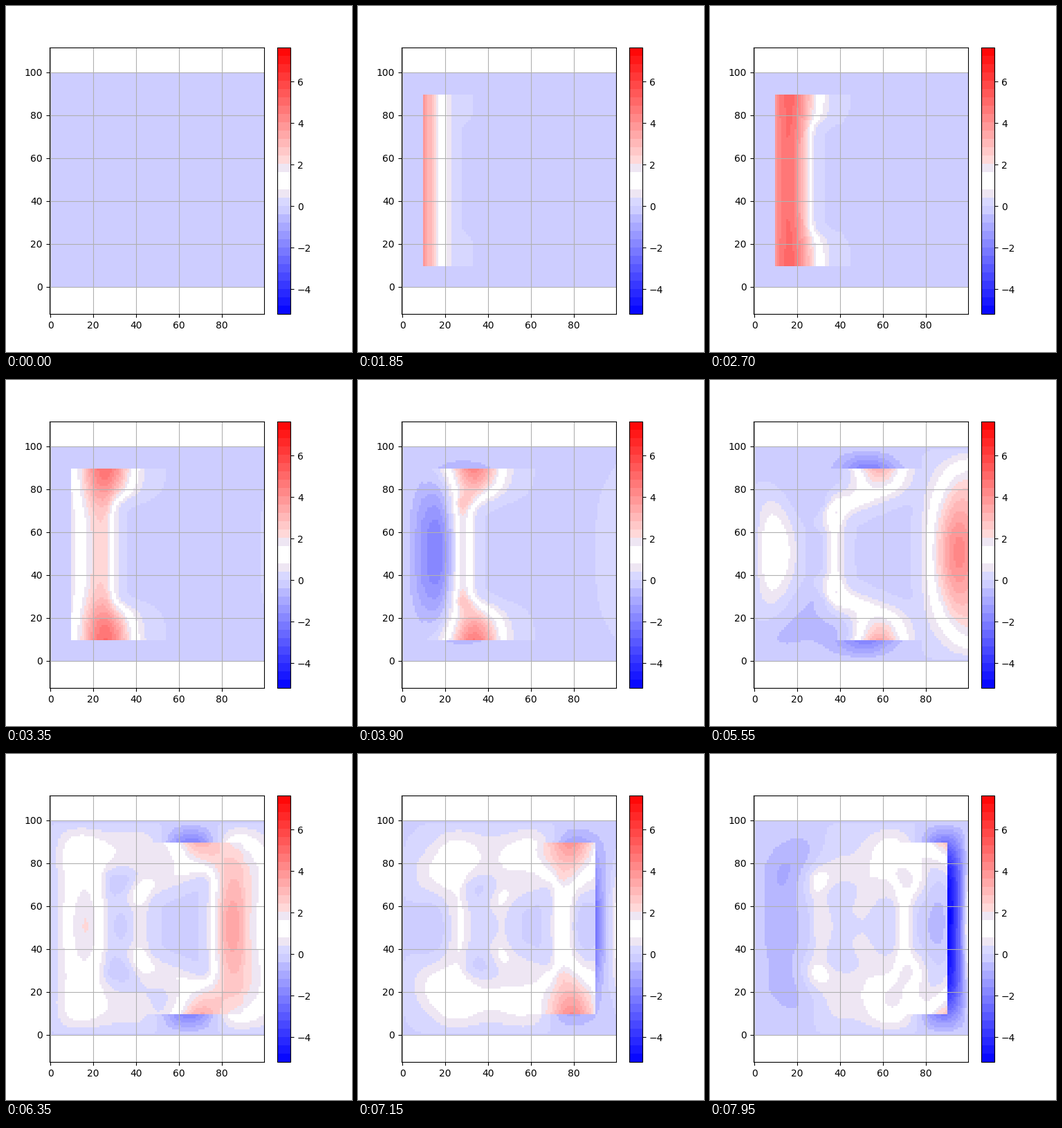
A matplotlib script that plays this animation: 500x500 px, repeating every 8000 ms.

```python
import numpy as np
import matplotlib.pyplot as plt
from matplotlib.animation import FuncAnimation
from matplotlib.colors import ListedColormap

N, FRAMES, INTERVAL = 100, 160, 50
QUIET = 20                      # frames before the pulse becomes visible
COURANT = 0.707
LO, HI = 10, 90                 # total-field cells are LO..HI-1
BLOCK = slice(26, 76)           # lossy dielectric square
EPS, LOSS = 6.0, 0.026
PEAK, DELAY, WIDTH = 5.0, 44, 17
ECHO = 0.85                     # right edge is driven by the left edge


def simulate():
    """2D TMz FDTD with a plane pulse injected on a total-field box."""
    ez, hx, hy = (np.zeros((N, N)) for _ in range(3))
    decay = np.ones((N, N))
    gain = np.full((N, N), COURANT)
    decay[BLOCK, BLOCK] = (1 - LOSS) / (1 + LOSS)
    gain[BLOCK, BLOCK] = COURANT / EPS / (1 + LOSS)

    # Incident line; cell 0 lies one cell left of the box
    e_inc, h_inc = np.zeros(200), np.zeros(199)
    span = HI - LO
    box = slice(LO, HI)
    inner = (slice(1, -1), slice(1, -1))

    fields = []
    for step in range(FRAMES):
        fields.append(ez.copy())

        hy[:-1] += COURANT * (ez[1:] - ez[:-1])
        hx[:, :-1] -= COURANT * (ez[:, 1:] - ez[:, :-1])
        hy[LO - 1, box] -= COURANT * e_inc[1]
        hy[HI - 1, box] += COURANT * e_inc[span]
        hx[box, LO - 1] += COURANT * e_inc[1:span + 1]
        hx[box, HI - 1] -= COURANT * e_inc[1:span + 1]
        h_inc += COURANT * (e_inc[1:] - e_inc[:-1])

        curl = hy[1:-1, 1:-1] - hy[:-2, 1:-1] - hx[1:-1, 1:-1] + hx[1:-1, :-2]
        ez[inner] = decay[inner] * ez[inner] + gain[inner] * curl
        ez[LO, box] -= COURANT * h_inc[0]
        ez[HI - 1, box] += COURANT * h_inc[span]
        ez[-1, 1:-1] = -ECHO * hy[0, 1:-1]

        e_inc[1:-1] += COURANT * (h_inc[1:] - h_inc[:-1])
        e_inc[0] = PEAK * np.exp(-((step + 1 - DELAY) / WIDTH) ** 2)
    return fields


def banded_map():
    """Blue-white-red in 32 flat bands."""
    ramp = (16 * np.arange(16) + 7.5) / 255
    one = np.ones(16)
    blue = np.column_stack([ramp, ramp, one])
    colors = np.vstack([blue, blue[::-1, ::-1]])
    colors[12, :2] = 205 / 255
    colors[[14, 17]] = np.array([238, 230, 243]) / 255
    colors[15:17] = 1
    return ListedColormap(colors)


fields = simulate()
fig, ax = plt.subplots(figsize=(5, 5), dpi=100)
image = ax.imshow(np.zeros((N, N)), cmap=banded_map(), vmin=-5.2, vmax=7.65,
                  origin="lower", interpolation="nearest", aspect="auto")
fig.colorbar(image, ax=ax)
ax.set_xlim(-0.5, N - 0.5)
ax.set_ylim(49.5 - 62.1, 49.5 + 62.1)
ax.set_xticks(range(0, 100, 20))
ax.set_yticks(range(0, 101, 20))
ax.grid(True)


def draw(frame):
    image.set_data(fields[frame if frame >= QUIET else 0].T)
    return [image]


anim = FuncAnimation(fig, draw, frames=FRAMES, interval=INTERVAL,
                     repeat=True, repeat_delay=0)
plt.show()
```
